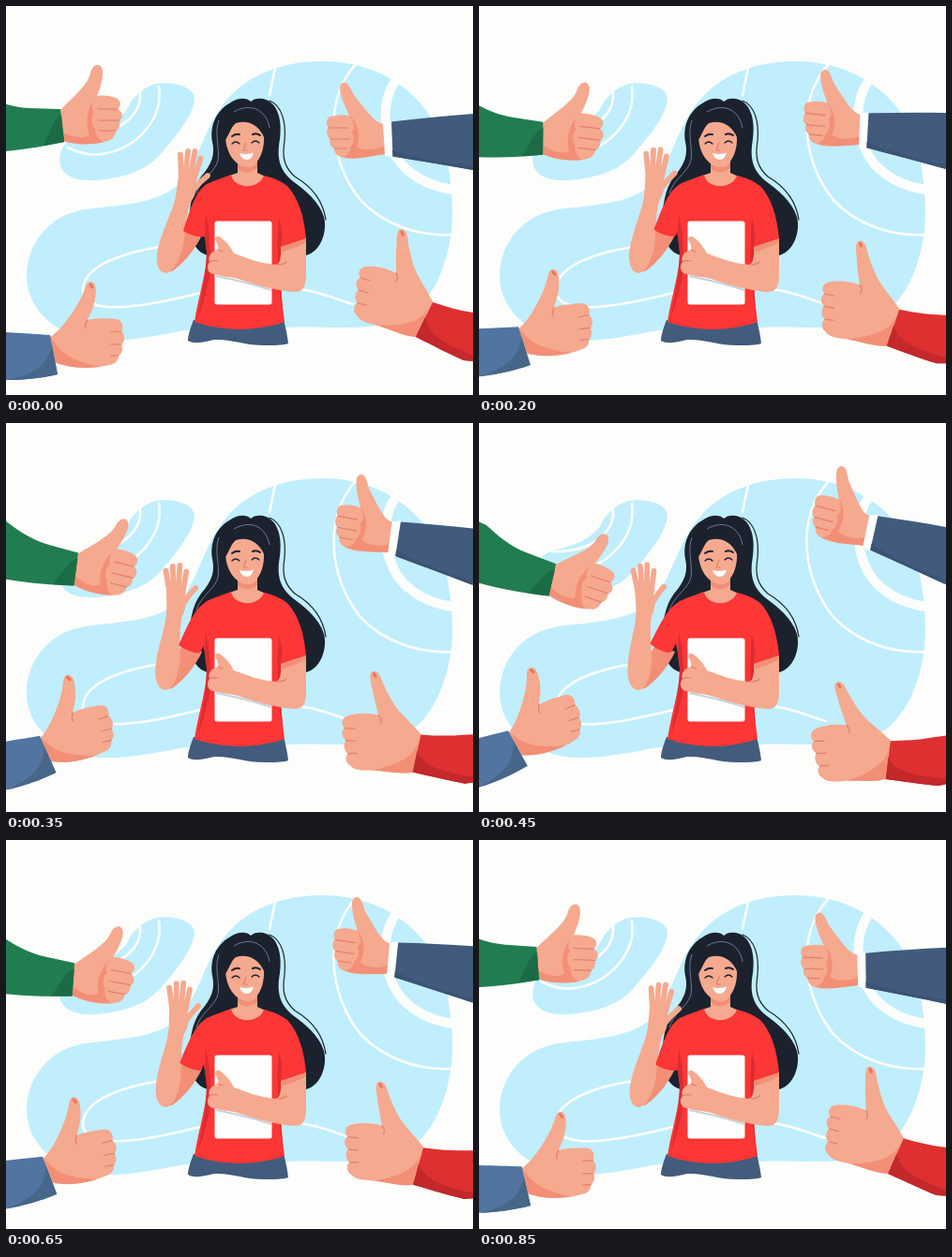
These frames come from a looping animation (498x415 px, 0.9 s). An HTML page:

```html
<!DOCTYPE html>
<html lang="en">
<head>
<meta charset="utf-8">
<title>Thumbs up</title>
<style>
  html, body { margin: 0; width: 100%; height: 100%; overflow: hidden; background: #fdfefc; }
  svg { display: block; }
  .skin { fill: #f5a98f; }
  .shade { fill: #f28f76; }
  .fold { fill: none; stroke: #e27f68; stroke-width: 1.2; stroke-linecap: round; stroke-linejoin: round; }
  .nail { fill: none; stroke: #e8755f; stroke-width: 3; stroke-linecap: round; }
  .fingers { fill: none; stroke: #f5a98f; stroke-width: 5.8; stroke-linecap: round; }
  .blob { fill: #c0eefd; }
  .trace { fill: none; stroke: #fdfefc; stroke-width: 2.6; stroke-linecap: round; }
  .red { fill: #fd3636; }
  .hair { fill: #1b222d; }
  .ink { fill: none; stroke: #1b222d; stroke-width: 1.2; stroke-linecap: round; }
</style>
</head>
<body>
<svg width="498" height="415" viewBox="0 0 498 415">
  <!-- backdrop -->
  <path class="blob" d="M22 288C22 255 45 220 92 216C140 211 165 208 187 188C208 160 212 125 240 95C265 70 300 59 337 59C388 59 435 82 460 130C475 165 478 215 475 240C470 280 452 325 415 337C380 347 335 341 300 343C250 345 215 342 185 347C150 354 125 358 100 357C55 353 22 325 22 288Z"/>
  <path class="blob" d="M58 170C55 154 64 142 78 136C105 131 127 120 133 102C141 93 148 86 160 83C180 80 202 87 201 100C198 120 180 140 165 158C148 178 120 184 95 186C78 187 62 183 58 170Z"/>
  <g class="trace">
    <path d="M163 86C168 118 142 152 102 158C88 160 76 156 66 151M143 92C145 114 124 138 78 137"/>
    <path d="M287 66L281 95M373 62C338 100 344 165 378 207C402 233 440 246 475 244"/>
    <path d="M190 253L165 257C130 262 80 276 82 305C86 332 150 321 215 304M310 302C330 303 350 312 370 318"/>
    <path style="stroke-width:10;stroke-linecap:butt" d="M415 80C398 106 403 146 422 169C436 184 455 193 477 196"/>
  </g>

  <!-- top left -->
  <g id="green">
    <path class="skin" d="M57 112C66 103 72 97 77 92C83 85 88 80 90 72C91 66 95 62 99 63C104 65 104 73 102 80C101 86 99 91 97 96C104 95 112 96 117 98C123 100 123 107 119 110C124 112 126 119 121 122C122 126 121 132 117 133C117 139 113 143 108 144C97 148 84 148 74 147C69 146 65 145 60 144Z"/>
    <path class="shade" d="M97 96C92 101 90 108 94 113C90 119 91 127 95 131C95 137 98 142 104 145C92 148 74 148 61 144V135C72 141 84 142 89 137C84 124 86 108 97 96Z"/>
    <path class="fold" d="M98 110H119M98 122H121M99 133H117"/>
    <path fill="#217d50" d="M-90 91L-26 95C-10 102 5 108 25 109L58 110L62 145C40 150 15 154-12 156L-90 162Z"/>
    <path fill="#1b6c46" d="M59 116C50 121 48 132 40 149L62 145Z"/>
  </g>

  <!-- bottom left -->
  <g id="blue">
    <path class="skin" d="M46 354C58 346 67 333 74 322C78 316 82 308 85 299C87 293 93 293 95 298C97 305 95 314 93 321C91 327 88 331 87 335C96 333 108 333 118 334C124 335 126 343 123 347C127 350 127 359 123 361C125 365 124 371 120 373C120 379 116 382 110 383C98 386 82 387 70 385C63 384 59 382 53 381Z"/>
    <path class="shade" d="M48 353C58 372 74 379 100 385C80 387 64 385 53 380Z"/>
    <path class="nail" d="M90 297L92 300"/>
    <path class="fold" d="M87 335C85 338 84 341 85 344M112 348L123 347M112 361H123M111 373H120"/>
    <path fill="#5174a0" d="M-80 345L0 348C18 349 32 350 47 351L55 393C38 397 18 399 0 399L-80 401Z"/>
    <path fill="#47678a" d="M49 362L55 393C38 397 18 399 0 399C25 394 44 386 49 362Z"/>
  </g>

  <!-- top right -->
  <g id="navy">
    <path class="skin" d="M404 126C396 125 393 121 388 116C382 109 375 100 371 95C369 91 367 86 364 83C360 80 356 83 356 88C357 96 360 104 363 110L366 117C358 115 350 117 346 118C341 119 341 127 344 130C341 133 342 140 346 142C344 146 346 150 350 152C350 157 353 160 357 161C365 164 376 163 385 161C392 159 398 159 404 158Z"/>
    <path class="shade" d="M366 117C371 123 373 129 369 134C372 140 371 147 367 151C368 155 364 160 358 161C376 164 396 159 404 158V149C392 155 380 154 374 150C378 140 376 124 366 117Z"/>
    <path class="fold" d="M344 130H365M346 142H366M350 152H364"/>
    <path fill="#fff" d="M402 125L411 122L413 162L404 159Z"/>
    <path fill="#425b7d" d="M411 123.500C440 120 470 117 498 115L580 110V184L498 175C470 170 440 165 412.500 160.500Z"/>
    <path fill="#3b5374" d="M412 154C440 163 470 168 498 170V175C470 170 440 165 412.500 160.500Z"/>
  </g>

  <!-- bottom right -->
  <g id="crimson">
    <path class="skin" d="M457 319C450 305 443 295 438 285C434 276 430 262 428 246C427 238 420 236 418 241C416 246 417 254 416 263C416 272 416 279 416 285C405 279 392 277 383 278C376 279 375 286 378 290C373 291 372 298 376 303C372 305 371 314 375 317C370 319 370 327 374 330C376 335 384 338 393 340C408 344 425 353 439 353Z"/>
    <path class="shade" d="M452 318C446 338 424 341 397 341C410 345 425 353 439 353Z"/>
    <path class="nail" d="M422 241L423 244"/>
    <path class="fold" d="M416 285C418 288 418 291 416 294M378 290L388 293M376 303L386 306M375 317L384 319"/>
    <path fill="#de3030" d="M455 316C470 321 484 325 498 327L580 343V400L498 379L488 378C474 372 455 362 437 353Z"/>
    <path fill="#c3282b" d="M437 353L447 332C450 352 472 362 498 373V379L488 378C474 372 455 362 437 353Z"/>
  </g>

  <!-- woman -->
  <path class="hair" d="M261 102C256 97 246 98 238 104C224 112 217 128 220 145C223 158 220 168 208 182C198 195 195 215 196 235C197 252 204 264 216 266H320C336 262 343 240 339 225C334 208 318 196 306 187C290 174 289 160 292 142C295 120 289 102 274 99C268 98 264 99 261 102Z"/>
  <path class="ink" d="M281 101C294 106 299 124 297 144C294 162 297 172 308 182C325 192 338 207 341 228"/>
  <path fill="none" stroke="#8fa0b0" stroke-width=".7" d="M227 122C221 138 230 156 225 168C219 180 207 186 203 200M243 113C262 102 278 112 281 130"/>
  <path class="skin" d="M247 158V178L238 181C243 198 271 198 277 182L268 178V158Z"/>
  <path class="shade" d="M247 165C254 174 262 174 268 167V172C261 180 252 178 247 173Z"/>
  <path class="skin" d="M234 138C236 126 248 121 258 121C268 121 274 126 275 138C276 155 269 171 257 172C244 171 234 156 234 138Z"/>
  <path class="hair" d="M233 144C238 138 239 130 245 125C257 121 270 126 276 142C283 126 274 112 258 112C242 112 229 126 233 144Z"/>
  <g class="ink">
    <path d="M241 147Q245 143 249 147M262 146Q266 142 270 146"/>
    <path style="stroke-width:2" d="M241 139Q245 136 249 137M263 137Q267 135 271 138"/>
  </g>
  <path class="fold" d="M256 146L253 154H257"/>
  <path fill="#fff" d="M249 157Q257 159 264 156.500Q262 164 257 164Q251 164 249 157Z"/>

  <path fill="#435b7c" d="M200 335C196 345 194 352 194 357C200 361 210 359 222 356C240 355 255 362 275 362C287 362 295 362 301 360C300 350 298 343 296 334Z"/>
  <path class="shade" d="M189 236L209 244C202 260 188 276 177 283L168 284L172 262Z"/>
  <g id="wave">
    <path class="skin" d="M184 180C182 195 182 203 178 214C172 230 163 250 161 265C160 277 163 284 170 285C178 285 186 270 189 255C191 240 192 222 197 209C201 204 203 198 203 190C202 183 199 181 196 180Z"/>
    <path class="fingers" d="M187 186L186 158.500M191 184L194 155M196 184L201.500 155M200 187L207.500 162.500M199 197L207 188L215 181"/>
  </g>
  <path class="red" d="M240 180C232 183 222 186 214 190C208 195 206 205 206 215L212 246L214 262C214 285 205 310 201 337C230 347 265 348 297 337C293 310 292 285 293 257L320 248C318 225 312 205 300 192C292 186 284 183 275 181C270 196 243 196 240 180Z"/>
  <path id="sleeve" class="red" d="M217 189C203 194 197 215 189 240C195 244 205 247 212 246C216 240 222 215 222 200Z"/>
  <path fill="#dc2c31" d="M212 246L213 222C217 240 219 262 218 284C215 300 210 318 205 332C209 305 214 285 214 262ZM293 257C295 245 294 235 291 226C289 250 288 290 297 337C293 310 292 285 293 257Z"/>
  <rect x="222.500" y="229.500" width="61" height="89" rx="2.500" fill="#fefefe"/>
  <path fill="none" stroke="#c4d2dc" stroke-width="2" d="M224 288C236 291 248 292 283 303"/>
  <path class="skin" d="M293 257C294 268 292 275 288 276C270 275 255 268 243 264C240 258 236 252 229 247C225 244 222 247 224 251C226 255 227 258 226 260C218 262 215 268 217 273C213 278 215 286 222 286C230 289 243 289 250 292C268 298 290 304 308 305C318 305 320 298 320 285V248Z"/>
  <path class="shade" d="M293 257L320 248V252C311 257 302 260 293 263Z"/>
  <path class="fold" d="M226 260L231 262M217 273Q221 271 226 272M290 276Q296 276 299 273"/>
</svg>
<script>
  // id: [degrees at full swing, pivot x, pivot y]
  const joints = {
    green: [19, -50, 202],
    blue: [-18, -33, 390],
    navy: [15, 510, 166],
    crimson: [-19, 516, 376],
    wave: [-10, 170, 280],
    sleeve: [9, 214, 196],
  };
  const STEP = 50, STEPS = 18, PEAK = 9;

  // Rises with a soft start, then returns evenly.
  const swing = step => step < PEAK ? (step / PEAK) ** 1.25 : (STEPS - step) / PEAK;

  function draw(now) {
    const amount = swing(Math.floor(now / STEP) % STEPS);
    for (const [id, [angle, x, y]] of Object.entries(joints)) {
      document.getElementById(id).setAttribute("transform", `rotate(${angle * amount} ${x} ${y})`);
    }
    requestAnimationFrame(() => draw(performance.now()));
  }
  draw(performance.now());
</script>
</body>
</html>
```
